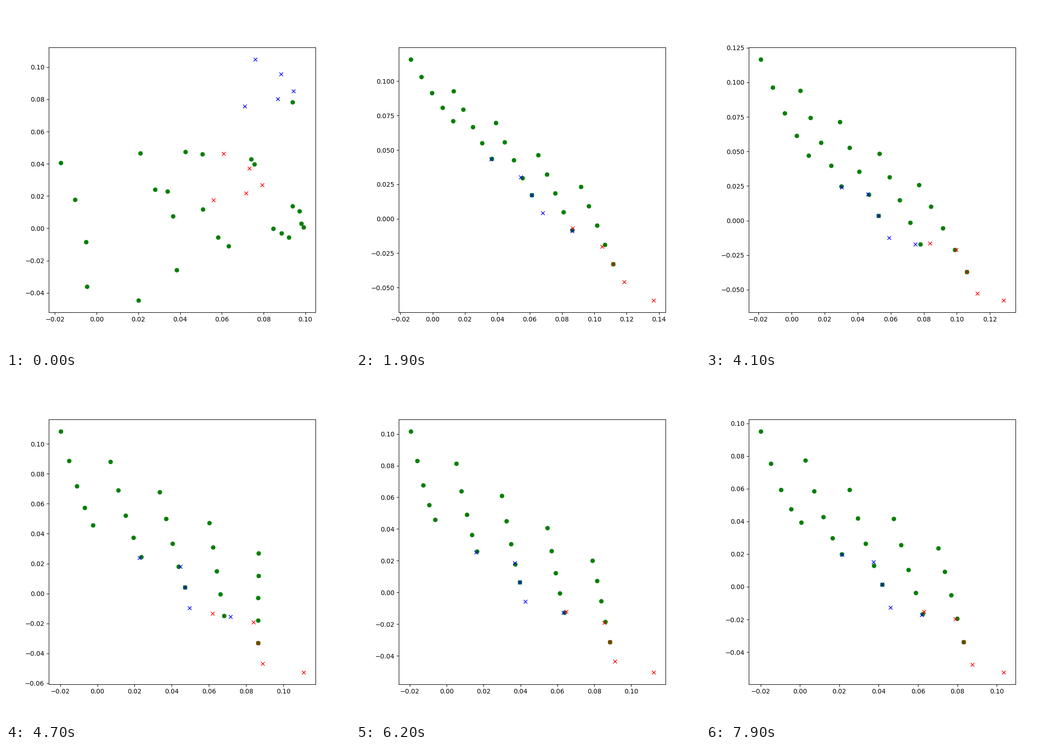
A matplotlib script for the animation above (8000 ms loop, 748 px wide and 748 px high).

```python
import matplotlib.pyplot as plt
import numpy as np
from matplotlib.animation import FuncAnimation

SIZE = 748
FRAMES, INTERVAL = 80, 100
LOOP = FRAMES * INTERVAL
N = 5

# Grid coordinates: u runs along the columns, v down the rows.
u, v = [c.ravel() for c in np.meshgrid(*[np.linspace(0, 1, N)] * 2, indexing="ij")]


def span(values, low, high):
    """Rescale values so that they fill the range from low to high."""
    values = values - values.min()
    return low + values / values.max() * (high - low)


def scattered():
    """Untrained embedding: random states, both crosses tied in one shape."""
    rng = np.random.default_rng(4)
    x = np.sort(span(rng.uniform(size=N * N), -17.1, 99.1))
    y = span(rng.normal(size=N * N), -44.5, 78.3)
    y = -np.sort(-y.reshape(N, N), axis=1).ravel()
    blue = np.array([(71, 75.8), (76, 104.8), (86.7, 80.2), (88.3, 95.7), (94.3, 85.2)]).T
    red = blue - [[15.1], [58.4]]
    return np.hstack([[x, y], red, blue])


def unfolded(time, top_left, top_right, low_left, low_mid, low_right, right, down):
    """Trained embedding: a bent sheet with two crosses on its lower edge.

    The crosses reach one step left, up, down and right of their centre.
    """
    a, b, c, m, d, right, down = [
        np.array(p)[:, None]
        for p in (top_left, top_right, low_left, low_mid, low_right, right, down)]
    sheet = (1 - v) * (a + (b - a) * u) + v * (c + (d - c) * u)
    sheet += (m - (c + d) / 2) * 4 * u * (1 - u) * v
    sheet[1] -= 8 * time / LOOP * (1 - u) * 4 * v * (1 - v)
    steps = np.hstack([-right, -down, 0 * right, down, right])
    return np.hstack([sheet, d + steps, m + steps])


# Key poses in thousandths of a data unit: time, key points of the sheet, steps.
keys = [
    (1900, (-13.4, 115.9), (91.6, 23.3), (12.5, 71.1), (61.2, 17.3), (111.6, -33.1),
     (25.0, -26.1), (6.8, -13.0)),
    (3100, (-15.6, 123.1), (84.1, 29.2), (8.4, 52.3), (56.2, 8.0), (110.9, -37.8),
     (24.0, -22.7), (6.6, -17.3)),
    (4100, (-18.5, 116.6), (77.0, 25.9), (10.2, 47.2), (52.6, 3.5), (105.9, -36.9),
     (22.3, -20.6), (6.4, -15.8)),
    (5400, (-19.7, 107.3), (88.0, 27.1), (-4.2, 45.3), (46.3, 4.3), (83.6, -32.4),
     (24.8, -19.5), (1.9, -13.5)),
    (6900, (-19.0, 96.7), (71.2, 14.2), (-7.8, 46.7), (33.9, 8.2), (92.6, -30.3),
     (22.7, -18.6), (3.8, -11.1)),
    (7900, (-19.8, 95.1), (70.2, 23.7), (0.6, 39.4), (41.7, 1.3), (83.2, -33.7),
     (20.2, -18.5), (4.3, -13.9)),
]
times = [0] + [key[0] for key in keys]
poses = [scattered()] + [unfolded(*key) for key in keys]
easing = {0: 3, 4100: 3.4}  # ease-out power of the fast stretches


def embedding(time):
    k = min(np.searchsorted(times, time, side="right"), len(keys)) - 1
    s = (time - times[k]) / (times[k + 1] - times[k])
    s = 1 - (1 - s) ** easing.get(times[k], 1)
    return (poses[k] + (poses[k + 1] - poses[k]) * s) / 1000


fig, ax = plt.subplots(figsize=(SIZE / 100, SIZE / 100), dpi=100)
fig.subplots_adjust(left=0.1245)
grid, = ax.plot([], [], "go")
red, = ax.plot([], [], "rx")
blue, = ax.plot([], [], "bx")


def draw(frame):
    points = embedding(frame * INTERVAL)
    cuts = [N * N, N * N + N]
    for line, part in zip((grid, red, blue), np.split(points, cuts, axis=1)):
        line.set_data(*part)
    ax.relim()
    ax.autoscale_view()
    return grid, red, blue


anim = FuncAnimation(fig, draw, frames=FRAMES, interval=INTERVAL,
                     repeat=True, repeat_delay=0, blit=False)
plt.show()
```
